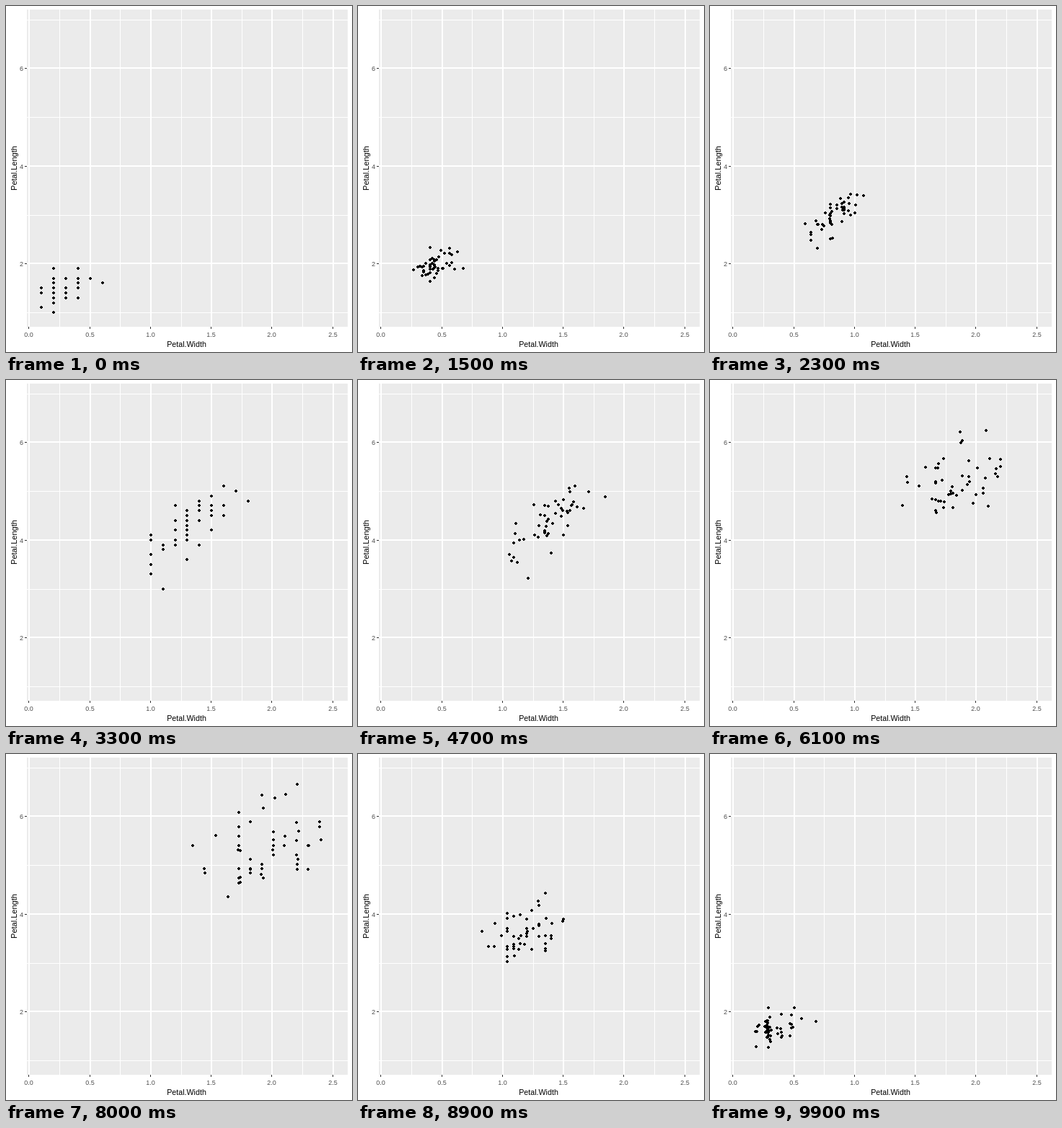
Recreate the animation shown at these times as an HTML page. Size 480 px wide and 480 px high, loop 10000 ms.

```html
<!DOCTYPE html>
<html lang="en">
<head>
<meta charset="utf-8">
<title>Petal scatter</title>
<style>
  html, body { margin: 0; width: 100%; height: 100%; overflow: hidden; background: #fff; }
  svg { display: block; width: 480px; height: 480px; }
  text { font-family: "Liberation Sans", Arial, sans-serif; }
  rect, path { shape-rendering: crispEdges; }
  .tick { font-size: 9px; fill: #4d4d4d; }
  .title { font-size: 11px; text-anchor: middle; }
</style>
</head>
<body>
<svg viewBox="0 0 480 480">
  <rect x="29" y="5" width="445" height="440" fill="#ebebeb"/>
  <g id="axes"></g>
  <path id="dots"/>
  <text class="title" x="250.5" y="473" style="font-size:10.7px">Petal.Width</text>
  <text class="title" transform="translate(15 225) rotate(-90)">Petal.Length</text>
</svg>
<script>
const axes = document.getElementById('axes');
const dots = document.getElementById('dots');

// Petal sizes of 50 flowers per species, in tenths.
const setosaWidth = [2,2,2,2,2,4,3,2,2,1, 2,2,1,1,2,4,4,3,3,3, 2,4,2,5,2,2,4,2,2,2,
  2,4,1,2,2,2,2,1,2,2, 3,3,2,6,4,3,2,2,2,2];
const setosaLength = [14,14,13,15,14,17,14,15,14,15, 15,16,14,11,12,15,13,14,17,15,
  17,15,10,17,19,16,16,15,14,16, 16,15,15,14,15,12,13,14,13,15, 13,13,13,16,19,14,16,14,15,14];
const versicolorWidth = [14,15,15,13,15,13,16,10,13,14, 10,15,10,14,13,14,15,10,15,11,
  18,13,15,12,13,14,14,17,15,10, 11,10,12,16,15,16,15,13,13,13, 12,14,12,10,13,12,13,13,11,13];
const versicolorLength = [47,45,49,40,46,45,47,33,46,39, 35,42,40,47,36,44,45,41,45,39,
  48,40,49,47,43,44,48,50,45,35, 38,37,39,51,45,45,47,44,41,40, 44,46,40,33,42,42,42,43,30,41];
const virginicaWidth = [25,19,21,18,22,21,17,18,18,25, 20,19,21,20,24,23,18,22,23,15,
  23,20,20,18,21,18,18,18,21,16, 19,20,22,15,14,23,24,18,18,21, 24,23,19,23,25,23,19,20,23,18];
const virginicaLength = [60,51,59,56,58,66,45,63,58,61, 51,53,55,50,51,53,55,67,69,50,
  57,49,67,49,57,60,48,49,56,58, 61,64,56,51,56,61,56,55,48,54, 56,51,51,59,57,52,50,52,54,51];

const species = [
  { w: setosaWidth, l: setosaLength },
  { w: versicolorWidth, l: versicolorLength },
  { w: virginicaWidth, l: virginicaLength },
];

// Each move runs from one species to the next, in steps of 100 ms.
const moves = [
  { start: 11, end: 33 },
  { start: 45, end: 67 },
  { start: 79, end: 100 },
];
const STEP = 100, STEPS = 100;

const px = width => 32.37 + width * 168.56;
const py = length => 445.1 - (length - 0.705) * 67.76;
const mix = (a, b, p) => a + (b - a) * p;

function add(name, attrs, content = '') {
  const node = document.createElementNS('http://www.w3.org/2000/svg', name);
  for (const key in attrs) node.setAttribute(key, attrs[key]);
  node.textContent = content;
  axes.append(node);
}
const box = (x, y, width, height, fill) => add('rect', { x, y, width, height, fill });
const label = (x, y, anchor, content) =>
  add('text', { x, y, class: 'tick', 'text-anchor': anchor }, content);

function drawAxes() {
  for (let v = 0.25; v < 2.5; v += 0.5) box(Math.floor(px(v)), 5, 1, 440, '#fff');
  for (let v = 1; v <= 7; v += 2) box(29, Math.round(py(v)), 445, 1, '#fff');
  for (let v = 0; v <= 2.5; v += 0.5) {
    const x = Math.round(px(v));
    box(x - 1, 5, 2, 440, '#fff');
    box(x - 1, 445, 1, 3, '#333');
    label(x - 0.5, 459, 'middle', v.toFixed(1));
  }
  for (let v = 2; v <= 6; v += 2) {
    const y = Math.round(py(v));
    box(29, y - 1, 445, 2, '#fff');
    box(26, y, 3, 1, '#333');
    label(24, y + 4, 'end', v);
  }
}

function drawDots(step) {
  let from = 0, p = 0;
  moves.forEach((move, i) => {
    if (step <= move.start) return;
    from = i;
    p = Math.min(1, (step - move.start) / (move.end - move.start));
  });
  const a = species[from], b = species[(from + 1) % species.length];
  dots.setAttribute('d', a.w.map((w, i) => {
    const x = Math.round(px(mix(w, b.w[i], p) / 10));
    const y = Math.round(py(mix(a.l[i], b.l[i], p) / 10));
    return `M${x - 1} ${y - 2}h2v1h1v2h-1v1h-2v-1h-1v-2h1z`;
  }).join(''));
}

const begin = performance.now();
let shown = -1;
function tick() {
  const step = Math.floor(Math.max(0, performance.now() - begin) / STEP) % STEPS;
  if (step !== shown) drawDots(shown = step);
  requestAnimationFrame(tick);
}

drawAxes();
tick();
</script>
</body>
</html>
```
